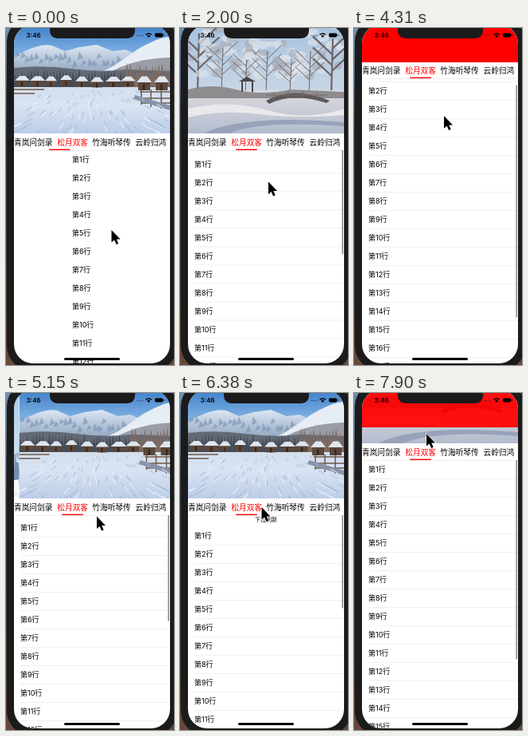
Write an HTML page that moves like this. It is 211 px wide and 422 px high and loops after 8 s.

```html
<!DOCTYPE html>
<html lang="zh-CN">
<head>
<meta charset="utf-8">
<title>Nested scroll demo</title>
<style>
html, body { margin: 0; width: 100%; height: 100%; overflow: hidden; background: #1b1b1c; }
svg { display: block; width: 211px; height: 422px; }
text { font-family: Inter, "Noto Sans CJK SC", "Noto Sans CJK", sans-serif; }
#rows text { font-size: 9px; }
#tabs text { font-size: 9.7px; }
.clock { font: 600 8px Inter, sans-serif; }
</style>
</head>
<body>
<svg viewBox="0 0 211 422">
  <defs>
    <linearGradient id="desk" x2="0" y2="1">
      <stop stop-color="#6d8fb2"/><stop offset=".3" stop-color="#2c3442"/>
      <stop offset=".8" stop-color="#4a3a33"/><stop offset="1" stop-color="#68493a"/>
    </linearGradient>
    <linearGradient id="skyA" x2="0" y2="1"><stop stop-color="#4585cc"/><stop offset=".3" stop-color="#8dbbe8"/></linearGradient>
    <linearGradient id="rangeA" x2="0" y2="1"><stop stop-color="#dde7f3"/><stop offset="1" stop-color="#8097b5"/></linearGradient>
    <linearGradient id="snowA" x2="0" y2="1"><stop stop-color="#d3deed"/><stop offset=".4" stop-color="#d9e3f2"/><stop offset="1" stop-color="#bccde8"/></linearGradient>
    <linearGradient id="skyB" x2="0" y2="1"><stop stop-color="#a9c3de"/><stop offset="1" stop-color="#dde3ea"/></linearGradient>
    <linearGradient id="snowB" x2="0" y2="1"><stop stop-color="#dcdbe0"/><stop offset="1" stop-color="#b3bccd"/></linearGradient>
    <linearGradient id="skyC" x2="0" y2="1"><stop stop-color="#a8cbe8"/><stop offset="1" stop-color="#e4eff7"/></linearGradient>
    <clipPath id="screen"><rect x="10" y="-4" width="196" height="424" rx="24"/></clipPath>
    <clipPath id="frame"><rect width="196" height="132"/></clipPath>
  </defs>

  <rect width="211" height="422" fill="url(#desk)"/>
  <rect x="1" y="-14" width="214" height="443" rx="31" fill="#1b1b1c"/>

  <g clip-path="url(#screen)">
    <rect x="10" y="-4" width="196" height="424" fill="#fff"/>
    <g id="rows">
      <text id="hint" x="108" y="146.6" text-anchor="middle" style="font-size:7px">下拉刷新</text>
      <path id="lines" fill="none" stroke="#ededef" stroke-width=".8"/>
    </g>

    <g id="head">
      <g transform="translate(10 0)">
        <g class="pic" clip-path="url(#frame)">
          <rect width="196" height="132" fill="url(#skyA)"/>
          <path d="M0 36Q14 28 26 24T48 22L64 29 82 24 104 21 124 29 140 27 160 36V64H0Z" fill="url(#rangeA)"/>
          <g id="ridges"></g>
          <path d="M112 54C134 45 148 28 172 18Q186 11 196 11V72H112Z" fill="#e6edf5"/>
          <path d="M118 57Q150 38 196 37V72H118Z" fill="#9a9ca6"/>
          <path d="M0 50Q35 46 72 51T140 52L196 54V76H0Z" fill="#636a75"/>
          <rect y="73" width="196" height="59" fill="url(#snowA)"/>
          <g id="woods"></g>
          <g id="cabins"></g>
          <path d="M0 77H38M0 82H26M158 80H196M156 88H196M160 94H196M160 78V96M172 77V99M185 77V101" stroke="#6d5a4c" stroke-width="1.5" fill="none"/>
          <path d="M152 84L196 97V103L150 89Z" fill="#8793a8"/>
          <g id="ruts" stroke-width="1.3"></g>
        </g>
        <g class="pic" clip-path="url(#frame)">
          <rect width="196" height="132" fill="url(#skyB)"/>
          <g id="frost"></g>
          <rect y="78" width="196" height="54" fill="url(#snowB)"/>
          <path d="M0 77Q30 69 60 77T130 77L196 80V88H0Z" fill="#8e8c8f"/>
          <path d="M64 67L74 61 85 67ZM67 67H69V80H67ZM80 67H82V80H80Z" fill="#4b4648"/>
          <path d="M98 91Q132 72 178 91L174 94Q132 80 102 95Z" fill="#5f5759"/>
          <path d="M98 84H176M108 80V91M126 78V88M144 78V88M162 80V91" stroke="#736a6b" fill="none"/>
          <path d="M0 101Q50 89 100 103T196 101V109Q140 114 90 108T0 112Z" fill="#ebe8eb"/>
          <path d="M20 132Q70 108 196 118V123Q90 115 52 132Z" fill="#98a3bb"/>
        </g>
        <g class="pic" clip-path="url(#frame)">
          <rect width="196" height="132" fill="url(#skyC)"/>
          <path d="M0 83Q60 69 110 80T196 74V116H0Z" fill="#96b2ce"/>
          <g id="firs"></g>
          <path d="M0 110Q40 105 92 112T196 108V132H0Z" fill="#f6f9fc"/>
          <path d="M0 122Q70 113 140 124T196 121V126Q100 130 0 125Z" fill="#e2ebf4"/>
        </g>
      </g>
      <g id="tabs">
        <rect x="10" y="132" width="196" height="21.5" fill="#fff"/>
        <path d="M10 153.4H206" stroke="#e6e6e8" stroke-width=".7"/>
        <text x="10" y="146.6">青岚问剑录</text>
        <text x="64.3" y="146.6" fill="#f00">松月双客</text>
        <text x="108.3" y="146.6">竹海听琴传</text>
        <text x="162.5" y="146.6">云岭归鸿</text>
        <rect id="mark" x="70.3" y="151.6" width="26.5" height="1.4" fill="#f00"/>
      </g>
    </g>

    <rect id="bar" x="10" y="-4" width="196" height="47" fill="#f00"/>
    <rect id="thumb" x="203.4" width="1.5" rx=".7" fill="#858587"/>
    <path d="M51 -4Q55 -3 55 2Q55 13 66 13H151Q162 13 162 2Q162 -3 166 -4Z" fill="#1b1b1c"/>
    <text class="clock" x="25.5" y="12">3:46</text>
    <path d="M164 9.7H172" stroke="#222" stroke-opacity=".6" stroke-width="1.2" stroke-dasharray="1.2 1"/>
    <path d="M175 7.9Q179.2 4.4 183.4 7.9L182.3 9Q179.2 6.5 176.1 9ZM177 9.8Q179.2 8 181.4 9.8L179.2 12Z"/>
    <rect x="187" y="6.5" width="10" height="5" rx="1.4"/>
    <rect x="197.6" y="8" width="1" height="2"/>
    <rect x="73" y="413" width="70" height="3" rx="1.5"/>
  </g>

  <path id="cursor" d="M0 0V15.6L3.6 12.4 6.1 18 8.7 16.9 6.3 11.4H11Z" stroke="#fff" stroke-width="1.2" paint-order="stroke"/>
</svg>

<script>
const $ = id => document.getElementById(id);
const NS = "http://www.w3.org/2000/svg";
const LOOP = 8000, STEP = 117.6, PAGE = 196, ROW = 23;

function add(parent, tag, attrs, text) {
  const el = document.createElementNS(NS, tag);
  for (const k in attrs) el.setAttribute(k, attrs[k]);
  if (text) el.textContent = text;
  return parent.appendChild(el);
}

let seed = 11;
const rnd = (a, b) => {
  seed = seed * 16807 % 2147483647;
  return a + (b - a) * seed / 2147483647;
};

function cabin(x, y, w, h) {
  const g = $("cabins");
  add(g, "rect", { x, y, width: w, height: h, fill: "#5d4739" });
  add(g, "path", { d: `M${x - 2} ${y + 1}L${x + w * .3} ${y - h * .6}H${x + w * .75}L${x + w + 2} ${y + 1}Z`, fill: "#dfe6ef" });
  add(g, "rect", { x: x + w * .4, y: y + h * .3, width: w * .16, height: h * .7, fill: "#2e2723" });
}

function fir(x, top, base, fill) {
  const h = base - top;
  let d = "";
  for (let i = 0; i < 4; i++) {
    const w = h * (.08 + i * .045), y = top + h * i * .2;
    d += `M${x} ${y}L${x + w} ${y + h * .38}H${x - w}Z`;
  }
  add($("firs"), "path", { d, fill });
  add($("firs"), "path", { d: `M${x} ${top}l${h * .08} ${h * .3}l${-h * .1} ${-h * .06}Z`, fill: "#dfeaf4" });
}

function frostTree(x, base, h, trunk) {
  const g = $("frost");
  for (let i = 0; i < 16; i++) {
    add(g, "ellipse", {
      cx: x + rnd(-h * .35, h * .35), cy: base - h * rnd(.3, 1), rx: rnd(4, 9), ry: rnd(3, 6),
      fill: i % 3 ? "#dfe4ea" : "#a9acb5", "fill-opacity": .65
    });
  }
  let d = `M${x} ${base}L${x + 2} ${base - h * .8}`;
  for (let i = 0; i < 6; i++) d += `M${x + 1} ${base - h * (.25 + i * .08)}l${(i % 2 ? 1 : -1) * h * .28} ${-h * .26}`;
  add(g, "path", { d, stroke: "#6c6567", "stroke-width": trunk, fill: "none" });
}

// Village: shaded slopes, tree line, cabins, tracks running to the horizon
for (let x = 4; x < 136; x += 6) {
  const y = rnd(29, 40);
  add($("ridges"), "path", { d: `M${x} ${y}l${rnd(2, 6)} ${rnd(4, 9)}l-7 3Z`, fill: "#7f97b8", "fill-opacity": .7 });
}
for (let x = 2; x < 196; x += 4) {
  const y = x > 140 ? rnd(42, 52) : rnd(50, 58);
  add($("woods"), "path", { d: `M${x} ${y}l3.5 ${74 - y}h-7Z`, fill: x > 140 ? "#7d6a62" : "#454d59" });
}
for (let x = 3; x < 150; x += 19) cabin(x, rnd(64, 67), rnd(11, 16), 8);
cabin(156, 67, 15, 11);
cabin(178, 67, 15, 11);
for (let i = 0; i < 110; i++) {
  const y = rnd(78, 131), k = (y - 72) / 60, x = 98 + rnd(-125, 125) * (.45 + k * .55);
  const len = 2 + k * 7, slope = (x - 98) / 45;
  add($("ruts"), "path", {
    d: `M${x} ${y}l${slope * len} ${len}`,
    stroke: i % 3 ? "#a3b8d8" : "#f4f7fb", "stroke-opacity": .65
  });
}

[[12, 94], [42, 72], [72, 60], [98, 66], [128, 54], [152, 66], [180, 86]]
  .forEach(([x, h], i) => frostTree(x, 82, h, i % 6 ? 1 : 2.2));

for (let x = 4; x < 196; x += 7) fir(x, rnd(76, 90), 114, "#7190b0");
for (let x = 13; x < 190; x += 13) fir(x, x < 26 ? 78 : rnd(60, 76), 115, "#385877");

const rows = $("rows");
let lines = "";
for (let i = 0; i < 20; i++) {
  const y = 153.5 + i * ROW;
  add(rows, "text", { x: 18, y: y + 14.8 }, `第${i + 1}行`);
  lines += `M18 ${y + ROW}H206`;
}
$("lines").setAttribute("d", lines);

// Tracks of [time, value...]
const scroll = [[0, 0], [1885, 0], [2240, -16], [2475, -6], [2592, 0], [2827, 0], [3062, 18.5], [3180, 52], [3415, 125],
  [3950, 125], [4302, 109], [4538, 62], [4773, 8], [4891, -6], [5008, -9], [5126, -4], [5244, 0], [6140, 0],
  [6375, -14], [6610, -24], [6846, -10], [6963, 0], [7316, 0], [7551, 20], [7904, 69]];
const pointer = [[0, 132.5, 253], [240, 132.5, 253], [593, 122, 180], [1063, 107, 57], [1416, 111, 140], [1769, 111, 180],
  [1887, 111, 182], [2240, 111, 214], [2592, 109, 190], [3062, 107, 30], [3415, 109, 60], [3950, 109, 62],
  [4302, 113, 110], [4890, 114, 172], [5126, 114, 154.5], [5714, 108, 135], [6140, 103, 125], [6375, 102.5, 143],
  [6610, 103, 160], [7198, 98, 140], [7904, 91, 51]];
const slides = [943, 2942, 4914, 6942];

const clamp = (v, a = 0, b = 1) => Math.min(b, Math.max(a, v));
const ease = p => (1 - Math.cos(Math.PI * clamp(p))) / 2;

function at(track, t, k = 1) {
  const i = track.findIndex(p => p[0] > t);
  if (i < 0) return track[track.length - 1][k];
  const a = track[i - 1], b = track[i];
  return a[k] + (b[k] - a[k]) * (t - a[0]) / (b[0] - a[0]);
}

// Bursts of motion at a steady low frame rate, with pauses between
function stepped(t) {
  if (t < 240) return 0;
  const [start, count] = t < 3950 ? [240, 27] : t < 6140 ? [3950, 15] : [6140, 15];
  return start + STEP * Math.min(count, Math.floor((t - start) / STEP + .06));
}

const move = (el, x, y) => el.setAttribute("transform", `translate(${x.toFixed(2)} ${y.toFixed(2)})`);
const pics = document.querySelectorAll(".pic");

function draw(now) {
  const t = stepped(now % LOOP);
  const s = at(scroll, t), head = clamp(s, 0, 90);
  const page = t < 240 ? 65 : 65 * (1 - clamp((t - 122) / 350)) ** 3;

  const pos = slides.reduce((sum, start) => sum + ease((t - start) / 240), 0);
  pics.forEach((pic, i) => move(pic, PAGE * (((i - pos + 1) % 3 + 3) % 3 - 1), 0));

  move($("head"), 0, -head);
  move(rows, page, -s);
  move($("mark"), -page / 4, 0);
  $("hint").setAttribute("visibility", s < 0 ? "visible" : "hidden");
  $("lines").setAttribute("stroke-dasharray", `${t < 240 ? 0 : t < 1880 ? 126 : 188} 400`);
  $("bar").setAttribute("opacity", Math.sqrt(clamp(s / 80)));

  const thumb = $("thumb");
  thumb.setAttribute("visibility", t < 1880 ? "hidden" : "visible");
  thumb.setAttribute("y", 153 - head + Math.max(0, s - 90) * .45);
  thumb.setAttribute("height", 139 + 1.6 * Math.min(s, 95));
  move($("cursor"), at(pointer, t, 1), at(pointer, t, 2));
}

const begin = performance.now();
function tick() {
  draw(performance.now() - begin);
  requestAnimationFrame(tick);
}
tick();
</script>
</body>
</html>
```
